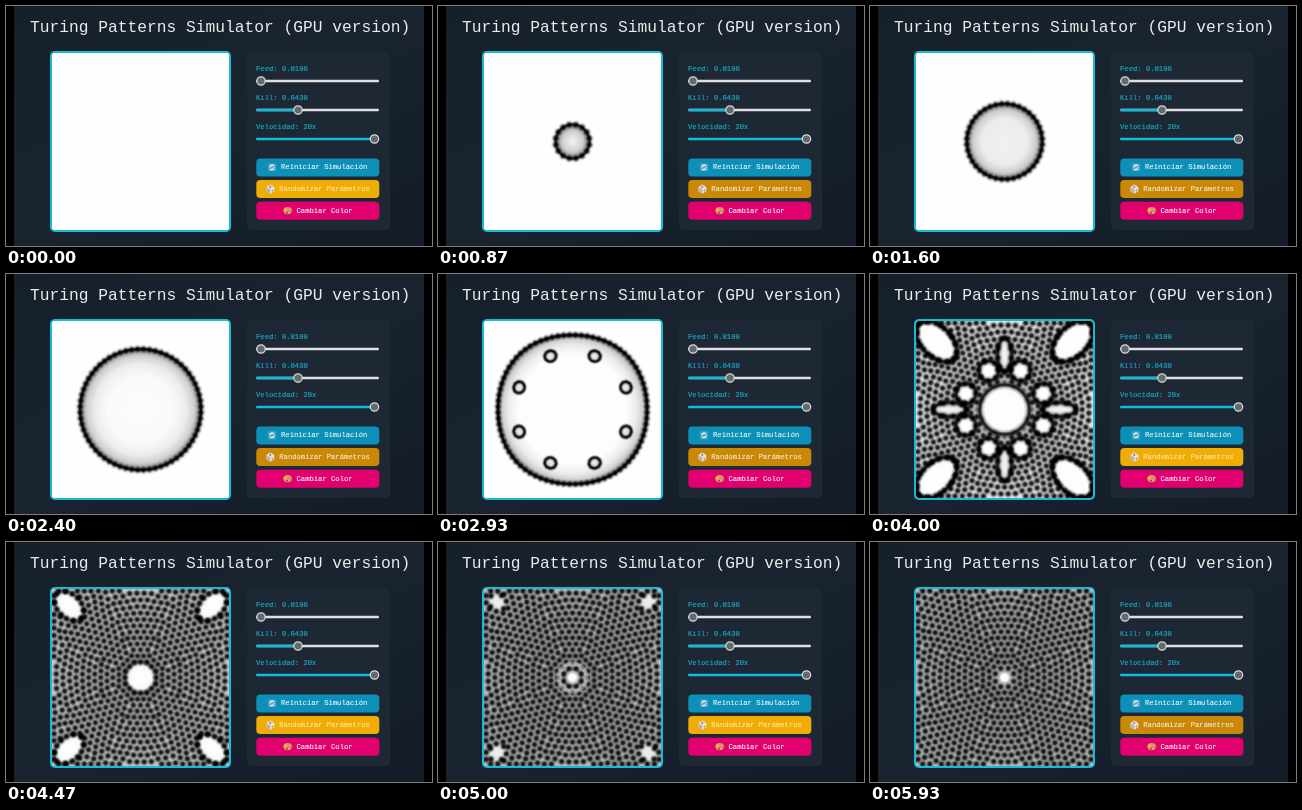
Recreate the animation shown at these times as an HTML page with a canvas. Size 426 px wide and 240 px high, loop 5.99 s.

```html
<!DOCTYPE html>
<html lang="es">
<head>
<meta charset="utf-8">
<title>Turing Patterns Simulator</title>
<style>
  html, body { margin: 0; width: 100%; height: 100%; overflow: hidden; background: #000; }
  svg { position: absolute; left: 0; top: 0; display: block; }
  canvas {
    position: absolute; left: 44px; top: 45px; width: 177px; height: 177px;
    border: 2px solid #14bcd8; border-radius: 5px; background: #fefefe;
  }
  text { font-family: "Liberation Mono", "Courier New", monospace; font-size: 7.2px; white-space: pre; }
  .title { font-size: 16.25px; fill: #ececec; }
  .label { fill: #18a5bd; stroke: #18a5bd; stroke-width: .2; }
  .btn { fill: #eef3f5; stroke: #eef3f5; stroke-width: .15; }
  .thumb { fill: #666a6e; stroke: #d8dadd; stroke-width: 1.2; }
</style>
</head>
<body>
<svg width="426" height="240" viewBox="0 0 426 240">
  <defs>
    <linearGradient id="bg" x1="0" y1="0" x2="1" y2="1">
      <stop offset="0" stop-color="#16202b"/>
      <stop offset=".5" stop-color="#192430"/>
      <stop offset="1" stop-color="#121b27"/>
    </linearGradient>
  </defs>
  <rect width="426" height="240" fill="#000"/>
  <rect x="8" width="410" height="240" fill="url(#bg)"/>
  <text class="title" x="24" y="25.7">Turing Patterns Simulator (GPU version)</text>
  <rect x="241" y="46" width="143" height="178" rx="4" fill="#1e2835"/>

  <text class="label" x="250" y="65">Feed: 0.0100</text>
  <text class="label" x="250" y="94.3">Kill: 0.0430</text>
  <text class="label" x="250" y="123.4">Velocidad: 20x</text>
  <g fill="#dfdfe6">
    <rect x="250" y="73.8" width="123" height="2.4" rx="1.2"/>
    <rect x="250" y="102.8" width="123" height="2.4" rx="1.2"/>
  </g>
  <g fill="#0cbcd8">
    <rect x="250" y="102.8" width="42" height="2.4" rx="1.2"/>
    <rect x="250" y="131.8" width="119" height="2.4" rx="1.2"/>
  </g>
  <circle class="thumb" cx="255" cy="75" r="4.2"/>
  <circle class="thumb" cx="292" cy="104" r="4.2"/>
  <circle class="thumb" cx="368.5" cy="133" r="4.2"/>

  <rect x="250.3" y="152.5" width="123" height="18" rx="4" fill="#0d90b7"/>
  <rect id="random" x="250.3" y="174" width="123" height="18" rx="4" fill="#f0ad05"/>
  <rect x="250.3" y="195.7" width="123" height="18" rx="4" fill="#e1006e"/>
  <text class="btn" x="275" y="163.3">Reiniciar Simulación</text>
  <text class="btn" x="273.3" y="185" id="randomText">Randomizar Parámetros</text>
  <text class="btn" x="290.5" y="206.7">Cambiar Color</text>

  <!-- button icons -->
  <rect x="262" y="157.3" width="8" height="8" rx="1.5" fill="#5a9fc4"/>
  <path d="M264 161.5a2.2 2.2 0 0 1 3.8-1.6M268 161.3a2.2 2.2 0 0 1-3.8 1.6" fill="none" stroke="#fff" stroke-width="1.1"/>
  <path d="M260.3 181l4-2.4 4 2.4v4.3l-4 2.4-4-2.4z" fill="#e6e2dc"/>
  <path d="M260.3 181l4 2.2v4.5l-4-2.4z" fill="#b9b4ae"/>
  <circle cx="264.3" cy="180.8" r=".9" fill="#b33"/>
  <circle cx="266.4" cy="184.6" r=".7" fill="#555"/>
  <ellipse cx="281.6" cy="204.6" rx="4.3" ry="3.7" fill="#e59a5c"/>
  <circle cx="279.5" cy="203.6" r=".9" fill="#f8d648"/>
  <circle cx="282" cy="202.7" r=".8" fill="#8fae4c"/>
  <circle cx="284" cy="204.6" r=".8" fill="#6a86c0"/>
  <circle cx="281" cy="206.6" r=".9" fill="#8a2850"/>
</svg>
<canvas id="sim" width="178" height="178"></canvas>

<script>
const LOOP = 5990, HALF = 89, TAU = Math.PI * 2;
const ctx = document.getElementById('sim').getContext('2d');
const randomBtn = document.getElementById('random');
const randomText = document.getElementById('randomText');

const clamp = (v, a = 0, b = 1) => Math.min(b, Math.max(a, v));
const ramp = (t, a, b) => clamp((t - a) / (b - a));
const black = a => `rgba(0,0,0,${a})`;
const white = a => `rgba(255,255,255,${a})`;

// Piecewise linear value through [time, value] pairs
function track(t, ...keys) {
  if (t <= keys[0][0]) return keys[0][1];
  for (let i = 1; i < keys.length; i++) {
    const [a, u] = keys[i - 1], [b, v] = keys[i];
    if (t < b) return u + (v - u) * (t - a) / (b - a);
  }
  return keys[keys.length - 1][1];
}

function gradient(r, stops) {
  const g = ctx.createRadialGradient(0, 0, 0, 0, 0, r);
  stops.forEach(([at, color]) => g.addColorStop(clamp(at), color));
  return g;
}

// Soft dark line along the current path: [width, alpha] passes
function softStroke(passes) {
  for (const [w, a] of passes) {
    ctx.lineWidth = w;
    ctx.strokeStyle = black(a);
    ctx.stroke();
  }
}

// Soft black spot
const spot = document.createElement('canvas');
spot.width = spot.height = 40;
{
  const c = spot.getContext('2d');
  const g = c.createRadialGradient(20, 20, 0, 20, 20, 20);
  [[0, .95], [.35, .8], [.6, .35], [.8, .12], [1, 0]].forEach(([at, a]) => g.addColorStop(at, black(a)));
  c.fillStyle = g;
  c.fillRect(0, 0, 40, 40);
}
function stamp(x, y, r, a = 1) {
  ctx.globalAlpha = a;
  ctx.drawImage(spot, x - r, y - r, 2 * r, 2 * r);
  ctx.globalAlpha = 1;
}

// Final spots: staggered rings, relaxed by mutual repulsion
function makeDots() {
  const list = [];
  for (let k = 0; k < 21; k++) {
    const r = 10 + 6.1 * k;
    const n = 8 * Math.max(1, Math.round(r * TAU / 6.9 / 8));
    for (let i = 0; i < n; i++) {
      const a = (i + (k % 2 ? 0 : .5)) * TAU / n;
      const x = r * Math.cos(a), y = r * Math.sin(a);
      if (Math.max(Math.abs(x), Math.abs(y)) < 88) list.push({ x, y });
    }
  }
  for (let step = 0; step < 35; step++) {
    list.forEach(p => { p.dx = p.dy = 0; });
    for (let i = 0; i < list.length; i++) {
      for (let j = 0; j < i; j++) {
        const p = list[i], q = list[j];
        const x = p.x - q.x, y = p.y - q.y, d = Math.hypot(x, y);
        if (d > 7.7 || d < .01) continue;
        const f = (7.7 - d) * .14 / d;
        p.dx += x * f; p.dy += y * f;
        q.dx -= x * f; q.dy -= y * f;
      }
    }
    list.forEach(p => {
      p.x = clamp(p.x + p.dx, -87, 87);
      p.y = clamp(p.y + p.dy, -87, 87);
      const d = Math.hypot(p.x, p.y);
      if (d < 10) { p.x *= 10 / d; p.y *= 10 / d; }
    });
  }
  return list;
}

const octants = [...Array(8).keys()].map(i => (i + .5) * TAU / 8);
const dots = makeDots();
dots.forEach(p => {
  p.r = Math.hypot(p.x, p.y);
  p.near = Math.min(...octants.map(a => Math.hypot(p.x - 58 * Math.cos(a), p.y - 58 * Math.sin(a))));
});

// Expanding beaded wave
function drawFront(t) {
  const r = .0285 * (t - 265), fade = 1 - ramp(t, 3500, 3850);
  if (r <= 0 || fade <= 0) return;
  const square = .04 * ramp(t, 2700, 3400);
  const at = a => {
    const q = r * (1 - square * Math.cos(4 * a));
    return [q * Math.cos(a), q * Math.sin(a)];
  };
  const core = .055 * (1 - ramp(r, 40, 66));
  const reach = 1 - .4 * ramp(r, 60, 88);
  const inside = px => 1 - px * reach / r;
  ctx.globalAlpha = fade;
  ctx.beginPath();
  for (let i = 0; i <= 96; i++) ctx.lineTo(...at(i * TAU / 96));
  ctx.fillStyle = gradient(r, [
    [0, black(core)], [inside(28), black(core + .005)], [inside(15), black(.07)],
    [inside(7), black(.18)], [inside(2), black(.4)], [1, black(.5)]
  ]);
  ctx.fill();
  softStroke([[2.6, .75]]);
  const n = 8 * Math.max(1, Math.round(r * TAU / 5.9 / 8));
  for (let i = 0; i < n; i++) stamp(...at((i + .5) * TAU / n), 4.9, fade);
}

// Eight lobed cells growing behind the wave
function drawCells(t) {
  const r = .0285 * (t - 2720), fade = 1 - ramp(t, 3480, 3850);
  if (r <= 0 || fade <= 0) return;
  const line = clamp(r / 12);
  for (const a of octants) {
    ctx.save();
    ctx.rotate(a);
    ctx.translate(58, 0);
    ctx.globalAlpha = fade;
    ctx.beginPath();
    for (let i = 0; i <= 72; i++) {
      const b = i * TAU / 72;
      const out = (1 + Math.cos(b)) / 2;
      const q = r * (.92 + .06 * out * Math.abs(Math.sin(4.5 * b)));
      ctx.lineTo(.95 * q * Math.cos(b), q * (1 + .04 * out) * Math.sin(b));
    }
    ctx.closePath();
    ctx.fillStyle = gradient(r, [[0, black(.04)], [.4, black(.08)], [.7, black(.24)], [.88, black(.55)], [1, black(.7)]]);
    ctx.fill();
    ctx.lineJoin = 'round';
    softStroke([[10 * line, .14], [7 * line, .3], [4.2 * line, .85]]);
    ctx.restore();
  }
}

// Empty ellipses that close as the spots spread
function holesAt(t) {
  const list = [];
  const add = (dist, angle, rx, ry, light = 1) => {
    if (Math.min(rx, ry) > .5) list.push({ dist, angle, rx, ry, light, c: Math.cos(angle), s: Math.sin(angle) });
  };
  const middle = track(t, [3400, 39], [4000, 25], [5000, 5]);
  add(0, 0, middle, middle);

  const cellDist = track(t, [3400, 58], [4000, 42]);
  const cell = track(t, [3400, 18], [4000, 10], [4500, 0]);
  octants.forEach(a => add(cellDist, a, cell, cell));

  const corner = track(t, [3400, 126], [4000, 97], [5000, 107]);
  const long = track(t, [3400, 38], [4000, 25], [5000, 9], [5500, 0]);
  const wide = track(t, [3400, 40], [4000, 15], [5000, 8], [5500, 0]);
  const eye = track(t, [3600, 0], [4000, 7], [4400, 0]);
  for (let i = 0; i < 4; i++) {
    add(corner, (i + .5) * TAU / 4, long, wide, track(t, [4500, 1], [5000, .75]));
    add(55, i * TAU / 4, eye * 2.4, eye, .45);
  }
  return list;
}

function drawHole(h, outline) {
  ctx.save();
  ctx.rotate(h.angle);
  ctx.translate(h.dist, 0);
  ctx.scale(h.rx, h.ry);
  ctx.beginPath();
  ctx.arc(0, 0, 1.1, 0, TAU);
  ctx.fillStyle = gradient(1.1, [[0, white(h.light)], [.7, white(.9 * h.light)], [1, white(0)]]);
  ctx.fill();
  ctx.beginPath();
  ctx.arc(0, 0, 1, 0, TAU);
  ctx.restore();
  softStroke([[9, .1 * outline], [6, .25 * outline], [3, .75 * outline]]);
}

// Moves a point that lies in a hole out to its rim
function pushOut(p, h) {
  const u = (p.x * h.c + p.y * h.s - h.dist) / h.rx;
  const v = (p.y * h.c - p.x * h.s) / h.ry;
  const d = Math.hypot(u, v);
  if (d >= 1 || d < .001) return p;
  const a = h.dist + u / d * h.rx, b = v / d * h.ry;
  return { x: a * h.c - b * h.s, y: a * h.s + b * h.c };
}

function drawDots(t) {
  const show = ramp(t, 3420, 3750);
  if (!show) return;
  const holes = holesAt(t);
  ctx.fillStyle = black(.27 * ramp(t, 3600, 4700));
  ctx.fillRect(-HALF, -HALF, 2 * HALF, 2 * HALF);
  const outline = show * (1 - ramp(t, 4100, 4700));
  ctx.globalAlpha = show;
  holes.forEach(h => drawHole(h, outline));

  const wave = .0285 * (t - 2720), inner = 88 - .05 * (t - 3400);
  for (const p of dots) {
    const a = show * clamp(Math.max(wave - p.near, p.r - inner) / 5);
    if (!a) continue;
    const { x, y } = holes.reduce(pushOut, p);
    stamp(clamp(x, -88, 88), clamp(y, -88, 88), 4.7, a);
  }

  const halo = ramp(t, 4700, 4950) * (1 - ramp(t, 5150, 5500));
  [[8.5, 2.5, black(.4 * halo)], [14, 4.5, white(.4 * halo)]].forEach(([r, w, color]) => {
    ctx.beginPath();
    ctx.arc(0, 0, r, 0, TAU);
    ctx.lineWidth = w;
    ctx.strokeStyle = color;
    ctx.stroke();
  });
}

function draw(t) {
  ctx.setTransform(1, 0, 0, 1, 0, 0);
  ctx.globalAlpha = 1;
  ctx.fillStyle = '#fefefe';
  ctx.fillRect(0, 0, 178, 178);
  ctx.translate(HALF, HALF);
  drawFront(t);
  drawCells(t);
  ctx.globalAlpha = 1;
  drawDots(t);
  const bright = t < 800 || (t >= 3700 && t < 5450);
  randomBtn.setAttribute('fill', bright ? '#f0ad05' : '#c98806');
  randomText.style.fill = bright ? '#fbe6a0' : '#f3ead6';
  randomText.style.stroke = randomText.style.fill;
}

const start = performance.now();
function tick() {
  const t = (performance.now() - start) % LOOP;
  // Simulation advances 15 times a second
  draw(Math.floor(t * 15 / 1000 + .06) * 1000 / 15);
  requestAnimationFrame(tick);
}
tick();
</script>
</body>
</html>
```
